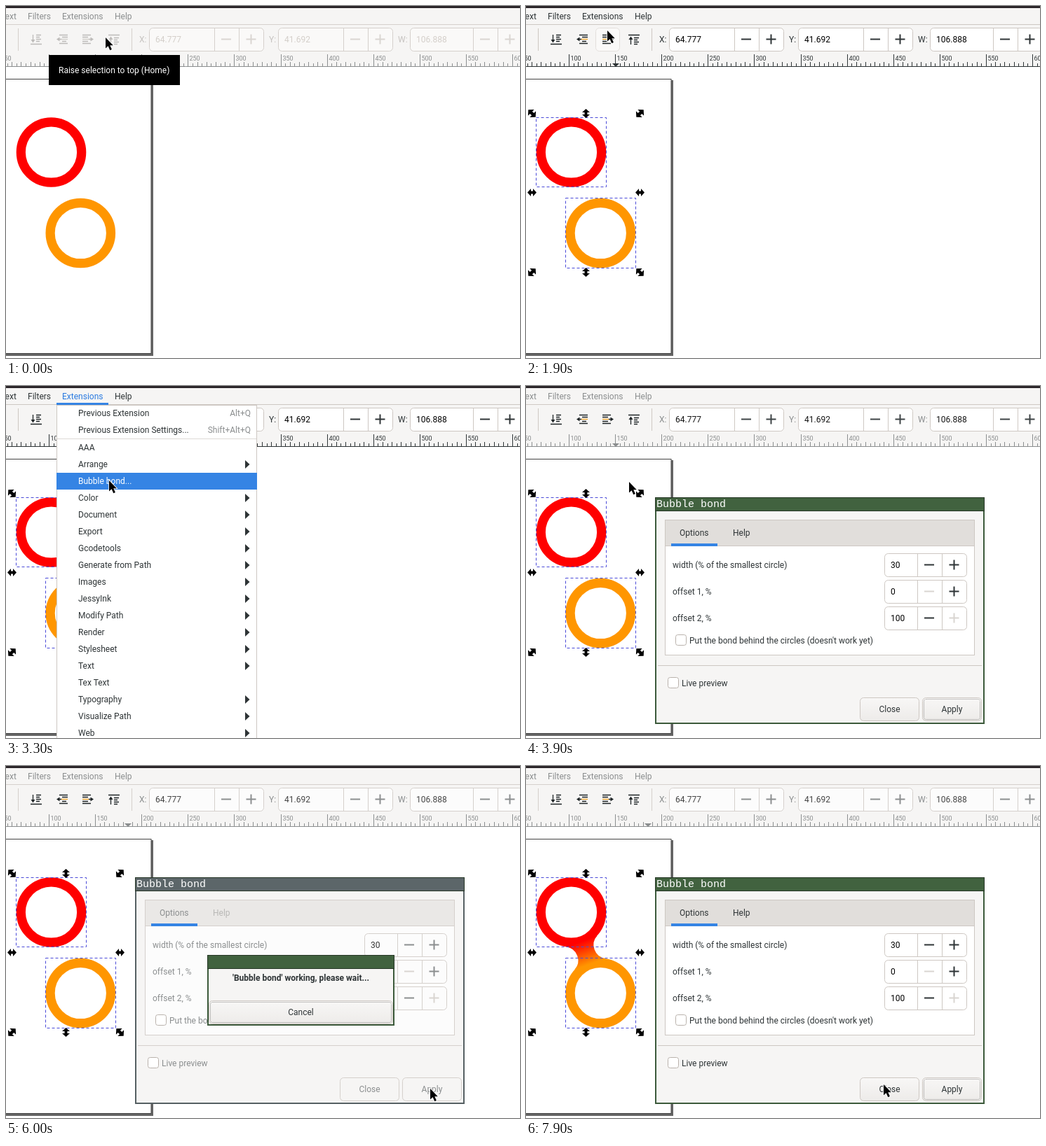
These frames come from a looping animation (733 px wide and 503 px high, 8000 ms). An HTML page:

```html
<!DOCTYPE html>
<html lang="en">
<head>
<meta charset="utf-8">
<title>Bubble bond extension</title>
<style>
html, body { margin: 0; width: 100%; height: 100%; overflow: hidden; background: #fff }
svg { display: block; font: 12px Roboto, sans-serif }
.anim { animation: 8s step-end infinite }

/* theme colours, set on the window and the dialog */
.t { fill: var(--m) }
.l { fill: var(--l) }
.v { fill: var(--v) }
.p { stroke: var(--p); stroke-width: 2; fill: none }
.off { stroke: #d9d5d1 }
.box { fill: var(--b); stroke: var(--e) }
.rule { stroke: var(--e); fill: none }
.tick { stroke: var(--m); fill: none }
.icon { stroke: var(--i); fill: none; stroke-width: 1.3 }
.head { fill: var(--i) }
.accent { stroke: var(--a) }
.btn { fill: var(--g); stroke: var(--e) }
.dots { fill: none; stroke: #8f8d8b; stroke-dasharray: 1 1 }
.title { font: 15px "Liberation Mono", monospace; fill: #fff }
.mid { text-anchor: middle }
.end { text-anchor: end; fill: #8b8e8f }
.small { font-size: 9px }
.dash { fill: none; stroke: #4a4ad8; stroke-dasharray: 4 3 }

.win { animation-name: win }
.dlg { animation-name: dlg, open }
.tip { animation-name: tip }
.sel { animation-name: sel }
.menu { animation-name: menu }
.hl { animation-name: hl }
.hover { animation-name: hover }
.press { animation-name: press }
.wait { animation-name: wait }
.focus { animation-name: focus }
.bond { animation-name: bond }
.mark { animation-name: mark }
.cursor { animation-name: cursor }

@keyframes win {
  0%, 83.75% { --m: #8b8e8f; --l: #c6c3c0; --v: #d4cfca; --p: #d9d5d1; --i: #bdbbb9; --a: #cfccc8; --b: #faf9f8; --e: #d5d0cc }
  13.75% { --m: #5c6162; --l: #acacaa; --v: #b3b2b0; --p: #b8b7b5; --i: #acacab; --a: #cfc5b4; --b: #faf9f8; --e: #d1ccc7 }
  15% { --m: #2e3436; --l: #929595; --v: #929595; --p: #9fa1a1; --i: #9a9c9d; --a: #d0bd96; --b: #faf9f8; --e: #cdc7c2 }
  21.25% { --m: #2e3436; --l: #606566; --v: #494b4b; --p: #656a6b; --i: #646869; --a: #dfad58; --b: #fdfcfc; --e: #cdc7c2 }
  22.5% { --m: #2e3436; --l: #2e3436; --v: #000; --p: #2e3436; --i: #1e2426; --a: #eb9f24; --b: #fff; --e: #cdc7c2 }
  47.5% { --m: #8b8e8f; --l: #6b6f70; --v: #000; --p: #2e3436; --i: #1e2426; --a: #eb9f24; --b: #fff; --e: #cdc7c2 }
  48.75% { --m: #8b8e8f; --l: #8b8e8f; --v: #151515; --p: #3d4345; --i: #1e2426; --a: #eb9f24; --b: #fff; --e: #cfc9c4 }
  50% { --m: #8b8e8f; --l: #8b8e8f; --v: #323232; --p: #6c7071; --i: #1e2426; --a: #eb9f24; --b: #fdfdfd; --e: #d3cec9 }
  51.25%, 87.5%, to { --m: #8b8e8f; --l: #8b8e8f; --v: #444; --p: #8b8e8f; --i: #1e2426; --a: #eb9f24; --b: #fcfcfc; --e: #d5d0cc }
  86.25% { --m: #8b8e8f; --l: #a9a9a7; --v: #8c8a87; --p: #b2b2b0; --i: #6e7070; --a: #ddb67a; --b: #fbfbfa; --e: #d5d0cc }
}
@keyframes dlg {
  0%, 87.5%, to { --m: #2e3436; --l: #2e3436; --v: #000; --p: #2e3436; --b: #fff; --e: #cdc7c2; --n: #e1dedb; --t: #41623f; --o: #3c5a3b; --g: url(#face) }
  75% { --m: #8b8e8f; --l: #b9b8b6; --v: #323232; --p: #8b8e8f; --b: #fcfcfc; --e: #d5d0cc; --n: #eae8e6; --t: #5c6669; --o: #566063; --g: #f6f5f4 }
  86.25% { --m: #5c6162; --l: #737676; --v: #191919; --p: #5c6162; --b: #fefefe; --e: #d1ccc7; --n: #e6e3e1; --t: #41623f; --o: #3c5a3b; --g: url(#face) }
}
@keyframes open { 0% { opacity: 0 } 47.5%, to { opacity: 1 } }
@keyframes tip { 0% { opacity: 1 } 6.25%, to { opacity: 0 } }
@keyframes sel { 0%, 83.75% { opacity: 0 } 21.25%, 86.25%, to { opacity: 1 } }
@keyframes menu { 0%, 46.25%, to { opacity: 0 } 32.5% { opacity: 1 } }
@keyframes hover { 0%, 26.25%, to { opacity: 0 } 23.75% { opacity: 1 } }
@keyframes press { 0%, 75%, to { opacity: 0 } 71.25% { opacity: 1 } }
@keyframes wait { 0%, 86.25%, to { opacity: 0 } 75% { opacity: 1 } }
@keyframes focus { 0%, 86.25%, to { opacity: 1 } 75% { opacity: 0 } }
@keyframes bond { 0% { opacity: 0 } 85%, to { opacity: 1 } }
@keyframes hl {
  0% { transform: translateY(-60px) }
  36.25% { transform: translateY(27px) }
  37.5% { transform: translateY(51px) }
  38.75% { transform: translateY(76px) }
  40% { transform: translateY(100px) }
  41.25%, to { transform: translateY(124px) }
}
@keyframes mark {
  0% { transform: translateX(136px) }
  21.25% { transform: translateX(133px) }
  22.5% { transform: translateX(128px) }
  53.75%, to { transform: translateX(174px) }
}
@keyframes cursor {
  0% { transform: translate(142px, 45px) }
  6.25% { transform: translate(141px, 58px) }
  7.5% { transform: translate(139px, 82px) }
  8.75% { transform: translate(137px, 105px) }
  10% { transform: translate(135px, 116px) }
  21.25% { transform: translate(133px, 106px) }
  22.5% { transform: translate(124px, 66px) }
  23.75% { transform: translate(116px, 35px) }
  25% { transform: translate(114px, 31px) }
  26.25% { transform: translate(112px, 23px) }
  27.5% { transform: translate(111px, 18px) }
  28.75% { transform: translate(111px, 16px) }
  30% { transform: translate(110px, 15px) }
  36.25% { transform: translate(112px, 31px) }
  37.5% { transform: translate(119px, 62px) }
  38.75% { transform: translate(130px, 94px) }
  40% { transform: translate(142px, 120px) }
  41.25% { transform: translate(147px, 135px) }
  46.25% { transform: translate(147px, 137px) }
  53.75% { transform: translate(424px, 395px) }
  57.5% { transform: translate(436px, 399px) }
  58.75% { transform: translate(470px, 410px) }
  60% { transform: translate(515px, 424px) }
  61.25% { transform: translate(552px, 436px) }
  62.5% { transform: translate(568px, 441px) }
  66.25% { transform: translate(600px, 448px) }
  67.5% { transform: translate(604px, 457px) }
  68.75% { transform: translate(605px, 461px) }
  97.5% { transform: translate(548px, 457px) }
  98.75%, to { transform: translate(510px, 455px) }
}
</style>
</head>
<body>
<script>
const text = (x, y, s, cls = 't') => `<text x="${x}" y="${y}" class="${cls}">${s}</text>`;
const rect = (x, y, w, h, attrs) => `<rect x="${x}" y="${y}" width="${w}" height="${h}" ${attrs}/>`;
const path = (d, cls) => `<path d="${d}" class="${cls}"/>`;
const group = (cls, ...parts) => `<g class="anim ${cls}">${parts.join('')}</g>`;

// number field with minus and plus
function spin(x, y, w, value, off = '') {
  const m = x + w - 53, p = x + w - 17.5, c = y + 16.5;
  return rect(x + .5, y + .5, w, 33, 'rx="5" class="box"') +
    path(`M${x + w - 69.5} ${y + 1}v32m35-32v32`, 'rule') +
    text(x + 9, y + 21, value, 'v') +
    path(`M${m - 7} ${c}h14`, off == '-' ? 'p off' : 'p') +
    path(`M${p - 7} ${c}h14m-7-7v14`, off == '+' ? 'p off' : 'p');
}

function button(x, y, w, h, label, extra = '') {
  return rect(x + .5, y + .5, w - 1, h - 1, 'rx="5" class="btn"') + extra +
    text(x + w / 2, y + h / 2 + 4, label, 't mid');
}

const check = (x, y) => rect(x + .5, y + .5, 15, 15, 'rx="3" fill="#fff" stroke="#b9b2ac"');
const focusRing = (x, y, w, h) => rect(x + 2.5, y + 2.5, w - 5, h - 5, 'rx="3" class="dots"');

function icon(x, lines, arrow, accent = '') {
  return `<g transform="translate(${x} 40)">${path(lines, 'icon')}${path(accent, 'icon accent')}${path(arrow, 'head')}</g>`;
}

function frame(x, y, w, h, bar, edge) {
  return rect(x, y, w, h, `fill="${edge}"`) +
    rect(x + 2, y + 20, w - 4, h - 22, 'fill="#f6f5f4"') +
    rect(x + .5, y + .5, w - 1, 19, `fill="${bar}" stroke="#263626"`);
}

function ruler() {
  let d = '', labels = '';
  for (let k = -10; k < 105; k++) {
    const x = Math.round(61 + k * 6.61) + .5;
    d += `M${x} ${k % 10 == 0 ? 69 : k % 2 == 0 ? 80 : 82}V86`;
    if (k % 10 == 0) labels += text(x + 2, 78, 100 + k * 5, 't small');
  }
  return path(d + 'M0 86.5H733', 'tick') + labels;
}

function handles() {
  const shape = 'M-6.5 0-1.5-5.5V-2H1.5V-5.5L6.5 0 1.5 5.5V2H-1.5V5.5Z';
  const place = (x, y, a) => `<path d="${shape}" transform="translate(${x} ${y}) rotate(${a}) scale(${a % 90 ? 1.13 : 1})"/>`;
  return place(8.5, 153.5, 45) + place(85.5, 153.5, 90) + place(162.5, 153.5, 135) +
    place(8.5, 266.5, 0) + place(162.5, 266.5, 0) +
    place(8.5, 380.5, 135) + place(85.5, 380.5, 90) + place(162.5, 380.5, 45);
}

// neck whose sides are arcs tangent to both circles
const A = [64.5, 209], B = [106.3, 324.5], R = 50;
function neck() {
  const half = Math.hypot(B[0] - A[0], B[1] - A[1]) / 2, waist = 13;
  const r = (half ** 2 + waist ** 2 - R * R) / (2 * (R - waist));
  const n = [(A[1] - B[1]) / 2 / half, (B[0] - A[0]) / 2 / half];
  const touch = (c, side) => [0, 1].map(i => {
    const f = (A[i] + B[i]) / 2 + side * n[i] * (waist + r);
    return (c[i] + (f - c[i]) * R / (R + r)).toFixed(2);
  });
  return `M${touch(A, 1)}A${r} ${r} 0 0 1 ${touch(B, 1)}L${touch(B, -1)}A${r} ${r} 0 0 1 ${touch(A, -1)}Z`;
}
const ring = (c, color) => `<circle cx="${c[0]}" cy="${c[1]}" r="43.2" fill="none" stroke="${color}" stroke-width="13.2"/>`;

const names = ['AAA', 'Arrange>', 'Bubble bond...', 'Color>', 'Document>', 'Export>', 'Gcodetools>',
  'Generate from Path>', 'Images>', 'JessyInk>', 'Modify Path>', 'Render>', 'Stylesheet>', 'Text>',
  'Tex Text', 'Typography>', 'Visualize Path>', 'Web>'];
function items(color) {
  const rows = names.map((s, i) => {
    const y = 88 + 24 * i;
    return text(103, y + 4, s.replace('>', ''), '') + (s.endsWith('>') ? `<path d="M341 ${y - 6}l6.5 6-6.5 6z"/>` : '');
  });
  return `<g fill="${color}">${text(103, 43, 'Previous Extension', '')}${text(103, 67, 'Previous Extension Settings...', '')}${rows.join('')}</g>`;
}

const win = group('win',
  rect(0, 0, 733, 87, 'fill="#f6f5f4"'), rect(0, 0, 733, 3, 'fill="#2b262a"'),
  text(-8, 19, 'Text'), text(31, 19, 'Filters'), text(80, 19, 'Extensions'), text(155, 19, 'Help'),
  path('M0 26.5H733M17.5 32V64M179.5 32V64', 'rule'),
  group('hover', rect(99.5, 31.5, 34, 33, 'rx="5" fill="#faf9f8" stroke="#e3dfdc"')),
  icon(35, 'M8 1.5h7M8 4.5h5M8 7.5h7M8 10.5h5M0 14.5h16M3.5 1v9', 'M.5 8h6l-3 4.5z'),
  icon(72, 'M4 1.5h12M8 4.5h8M8 10.5h6M4 13.5h12M3 7.5h4', 'M0 7.5l4.5-3v6z', 'M7 7.5h9'),
  icon(109, 'M0 1.5h12M0 4.5h8M0 10.5h8M0 13.5h12M9 7.5h4', 'M16 7.5l-4.5-3v6z', 'M0 7.5h9'),
  icon(146, 'M0 1.5h16M8 5.5h7M8 8.5h5M8 11.5h7M8 14.5h5M3.5 6v9', 'M.5 8h6l-3-4.5z'),
  text(190, 52, 'X:', 'l'), spin(204, 31, 163, '64.777'),
  text(375, 52, 'Y:', 'l'), spin(388, 31, 163, '41.692'),
  text(559, 52, 'W:', 'l'), spin(576, 31, 160, '106.888'),
  ruler(), group('mark', path('M-5 82H5L0 87Z', 't')));

const page = rect(0, 106, 210, 394, 'fill="#666"') + rect(-5, 104.5, 212, 392, 'fill="#fff" stroke="#444"');

const art = ring(A, '#f00') + ring(B, '#ff9600') +
  group('bond', `<path d="${neck()}" fill="url(#blend)"/>`) +
  group('sel', rect(14.5, 159.5, 100, 99, 'class="dash"'), rect(56.5, 274.5, 100, 100, 'class="dash"'), handles());

const menu = group('menu',
  rect(72, 4, 75, 22, 'fill="#f6f5f4"'), text(80, 19, 'Extensions', '" fill="#2a7ae0'),
  rect(72, 24, 74, 3, 'fill="#3584e4"'),
  rect(72.5, 27.5, 285, 490, 'fill="#fff" stroke="#cdc7c2"'),
  path('M73 75.5H357', '" stroke="#dedad7'),
  items('#2e3436'), text(349, 43, 'Alt+Q', 'end'), text(349, 67, 'Shift+Alt+Q', 'end'),
  rect(72, 0, 286, 24, 'fill="#3584e4" class="anim hl"'),
  `<g clip-path="url(#row)">${items('#fff')}</g>`);

const dialog = group('dlg',
  frame(184, 159, 470, 324, 'var(--t)', 'var(--o)').replace(/fill="(var\(--.\))"/g, 'style="fill:$1"'),
  text(186, 173, 'Bubble bond', 'title'),
  rect(198.5, 191.5, 441, 193, 'class="box"'),
  rect(199, 192, 440, 36, 'style="fill:var(--n)"'), path('M199 228.5H639M188 399.5H650', 'rule'),
  rect(207, 225, 66, 4, 'fill="#3584e4"'),
  text(219, 214, 'Options'), text(295, 214, 'Help', 'l'),
  text(209, 260, 'width (% of the smallest circle)'), spin(511, 239, 117, '30'),
  text(209, 298, 'offset 1, %'), spin(511, 277, 117, '0', '-'),
  text(209, 336, 'offset 2, %'), spin(511, 315, 117, '100', '+'),
  check(213, 355), text(233, 368, "Put the bond behind the circles (doesn't work yet)"),
  check(202, 416), text(222, 429, 'Live preview'),
  button(476, 445, 85, 34, 'Close'),
  button(565, 445, 85, 34, 'Apply',
    group('press', rect(565.5, 445.5, 84, 33, 'rx="5" fill="#d6d1cd" stroke="#cdc7c2"')) +
    group('focus', focusRing(565, 445, 85, 34))));

const wait = group('wait',
  `<g style="--m:#2e3436;--e:#cdc7c2;--g:url(#face)">`,
  frame(287, 270, 267, 101, '#41623f', '#3c5a3b'),
  text(420.5, 307, "'Bubble bond' working, please wait...", 't mid" font-weight="700'),
  button(289, 335, 263, 34, 'Cancel', focusRing(289, 335, 263, 34)), '</g>');

const tip = group('tip', rect(61, 70, 187, 43, ''), text(75, 96, 'Raise selection to top (Home)', '" fill="#fff'));

const cursor = group('cursor',
  '<path d="M0 0V15.5L3.6 12.3 6.3 18.2 8.9 17 6.3 11.3H10.8Z" stroke="#fff" stroke-width="1.6" paint-order="stroke"/>');

document.body.innerHTML = `<svg width="733" height="503" viewBox="0 0 733 503">
  <defs>
    <linearGradient id="face" x2="0" y2="1"><stop stop-color="#f8f7f6"/><stop offset="1" stop-color="#edebe9"/></linearGradient>
    <linearGradient id="blend" gradientUnits="userSpaceOnUse" x1="79.5" y1="250.5" x2="91.3" y2="283">
      <stop stop-color="#f00"/><stop offset="1" stop-color="#ff9600"/></linearGradient>
    <clipPath id="row"><rect x="72" width="286" height="24" class="anim hl"/></clipPath>
  </defs>
  ${page}${art}${win}${tip}${menu}${dialog}${wait}${cursor}</svg>`;
</script>
</body>
</html>
```
